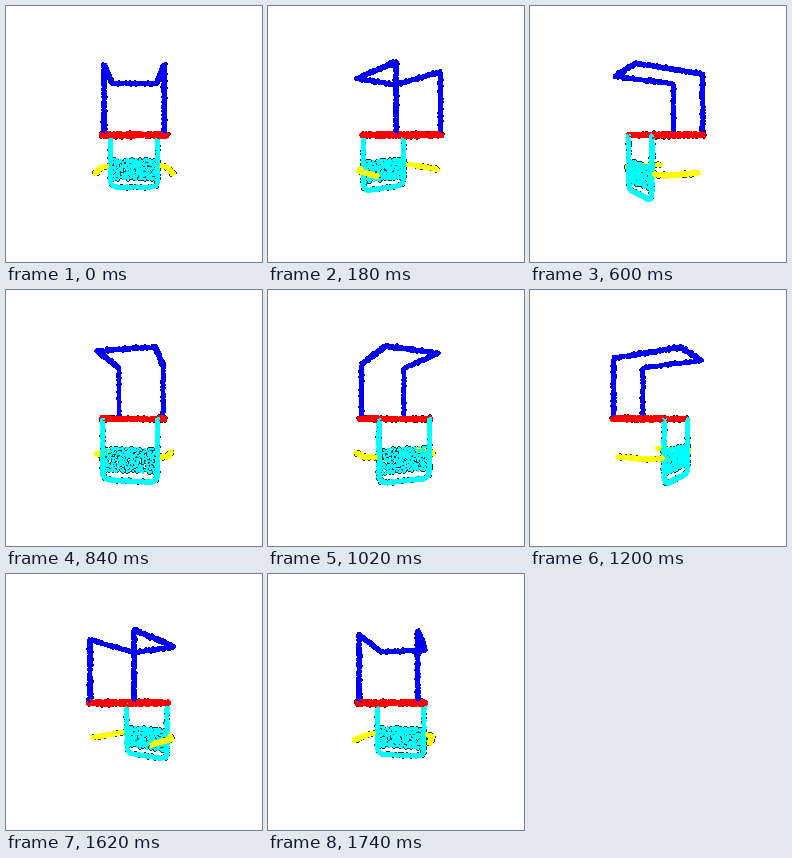
These frames come from a looping animation (256x256 px, 1800 ms). An HTML page with a canvas:

```html
<!DOCTYPE html>
<html lang="en">
<head>
<meta charset="utf-8">
<title>Turning chair frame</title>
<style>
html, body { margin: 0; width: 100%; height: 100%; overflow: hidden; background: #fff; }
canvas { display: block; width: 100vw; height: 100vh; image-rendering: pixelated; }
</style>
</head>
<body>
<canvas id="stage" width="256" height="256"></canvas>
<script>
const ctx = document.getElementById('stage').getContext('2d');
const STEP_MS = 60, STEPS = 30;
const CX = 128.2, CY = 128.9, CAMERA = 238;

const BLUE = { fill: '#0000ff', shade: '#000050' };
const RED = { fill: '#ff0000', shade: '#500000' };
const CYAN = { fill: '#00ffff', shade: '#003c3c' };
const YELLOW = { fill: '#ffff00', shade: '#3c3c00' };

let seed = 7;
function random() {
  seed = (seed * 1664525 + 1013904223) % 4294967296;
  return seed / 4294967296;
}

// A shaded point casts a dark rim that shows only at edges and gaps.
const points = [];
function addPoint(x, y, z, paint, shadeShare) {
  points.push({ x, y, z, paint, shaded: random() < shadeShare });
}

// Scatters points over the surface of a thin tube along a polyline of [x, y, z].
function tube(path, radius, paint) {
  for (let i = 1; i < path.length; i++) {
    const a = path[i - 1], b = path[i];
    const count = Math.ceil(Math.hypot(b[0] - a[0], b[1] - a[1], b[2] - a[2]) * 8);
    for (let n = 0; n < count; n++) {
      const k = random(), turn = random() * 2 * Math.PI, up = random() * 2 - 1;
      const flat = Math.sqrt(1 - up * up) * radius;
      addPoint(
        a[0] + (b[0] - a[0]) * k + flat * Math.cos(turn),
        a[1] + (b[1] - a[1]) * k + up * radius,
        a[2] + (b[2] - a[2]) * k + flat * Math.sin(turn),
        paint, 0.08
      );
    }
  }
}

// y points up from eye level, z points to the viewer at the start of the turn.
const W = 25.7, SEAT = 27, POST = 35.5, TOP = 59.6, BAR = -36, BACK = -21, LOW = -56.8;

tube([[-W, 2, POST], [-W, TOP, POST], [-W, TOP, BAR],
      [W, TOP, BAR], [W, TOP, POST], [W, 2, POST]], 1.75, BLUE);
tube([[-SEAT, 0, BACK], [-SEAT, 0, POST], [SEAT, 0, POST], [SEAT, 0, BACK]], 2.5, RED);
tube([[-W, 0, BACK], [-W, -50.5, BACK], [-W + 1.8, -54.8, BACK], [-W + 6, LOW, BACK],
      [W - 6, LOW, BACK], [W - 1.8, -54.8, BACK], [W, -50.5, BACK], [W, 0, BACK]], 1.75, CYAN);
for (const side of [-1, 1]) {
  tube([[side * 29, -33.5, BACK], [side * 35, -34.5, -12], [side * 35, -34.8, 23]], 1.9, YELLOW);
}
for (let n = 0; n < 480; n++) {
  addPoint((random() * 2 - 1) * W, -26.3 - random() * 22.4, BACK + random() * 2 - 1, CYAN, 0.6);
}

function draw(step) {
  const angle = step / STEPS * 2 * Math.PI;
  const cos = Math.cos(angle), sin = Math.sin(angle);
  ctx.fillStyle = '#fff';
  ctx.fillRect(0, 0, 256, 256);
  for (const p of points) {
    p.depth = p.z * cos - p.x * sin;
    const scale = CAMERA / (CAMERA - p.depth);
    p.px = Math.round(CX + (p.x * cos + p.z * sin) * scale - 1);
    p.py = Math.round(CY - p.y * scale - 1);
    if (p.shaded) {
      ctx.fillStyle = p.paint.shade;
      ctx.fillRect(p.px, p.py - 1, 2, 4);
      ctx.fillRect(p.px - 1, p.py, 4, 2);
    }
  }
  points.sort((a, b) => a.depth - b.depth);
  for (const p of points) {
    ctx.fillStyle = p.paint.fill;
    ctx.fillRect(p.px, p.py, 2, 2);
  }
}

let shown = -1;
function tick() {
  const step = Math.floor(performance.now() / STEP_MS) % STEPS;
  if (step !== shown) draw(shown = step);
  requestAnimationFrame(tick);
}
tick();
</script>
</body>
</html>
```
